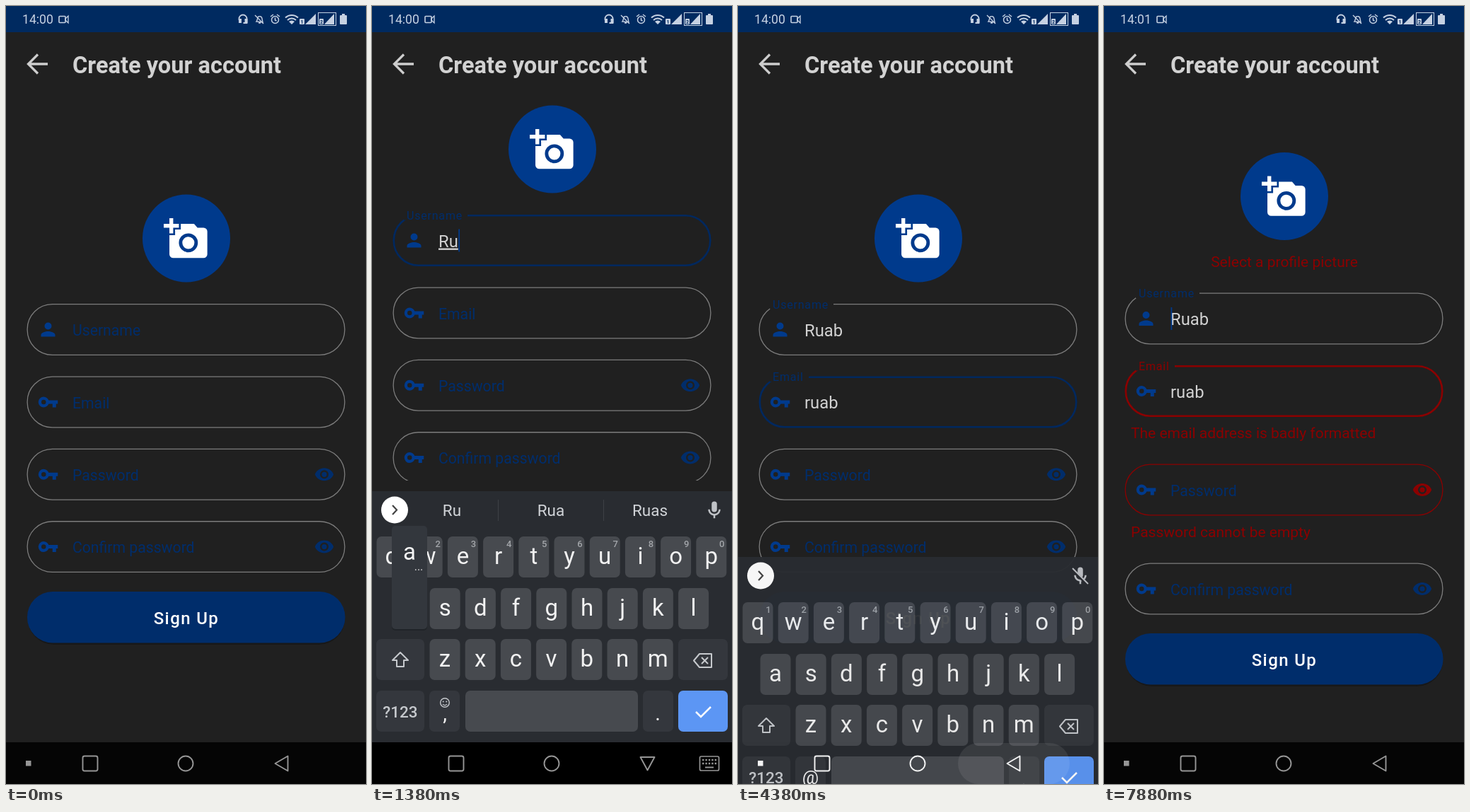
Recreate the animation shown at these times as an HTML page. Size 509 by 1100 pixels, loop 8 s.

```html
<!DOCTYPE html>
<html lang="en">
<head>
<meta charset="utf-8">
<title>Sign-up form</title>
<style>
html, body { margin: 0; height: 100%; overflow: hidden; background: #202020; }
svg { display: block; width: 100vw; height: 100vh; font-family: Roboto, sans-serif; }
</style>
</head>
<body>
<svg id="stage" viewBox="0 0 509 1100"></svg>
<script>
const LOOP = 8000, STEP = 125;
const BLUE = '#003a8c', NAVY = '#002d6b', RED = '#8b0000', GRAY = '#7c7c7c', BG = '#202020';
const NAME = 'Ruab', LOGIN = 'ruab';
const stage = document.getElementById('stage');
const ruler = document.createElement('canvas').getContext('2d');

const PERSON = 'M12 12a4 4 0 1 0 0-8 4 4 0 0 0 0 8zm0 2c-2.7 0-8 1.3-8 4v2h16v-2c0-2.7-5.3-4-8-4z';
const KEY = 'M12.65 10C11.8 7.7 9.6 6 7 6a6 6 0 0 0 0 12c2.6 0 4.8-1.7 5.65-4H17v4h4v-4h2v-4zM7 14.6a2.6 2.6 0 1 1 0-5.2 2.6 2.6 0 0 1 0 5.2z';
const EYE = 'M12 4.5C7 4.5 2.7 7.6 1 12c1.7 4.4 6 7.5 11 7.5s9.3-3.1 11-7.5c-1.7-4.4-6-7.5-11-7.5zM12 17a5 5 0 1 1 0-10 5 5 0 0 1 0 10zm0-8a3 3 0 1 0 0 6 3 3 0 0 0 0-6z';
const CAMERA = 'M3 4V1h2v3h3v2H5v3H3V6H0V4zM6 10V7h3V4h7l1.8 2H21a2 2 0 0 1 2 2v12a2 2 0 0 1-2 2H5a2 2 0 0 1-2-2V10zm7 9a5 5 0 1 0 0-10 5 5 0 0 0 0 10zm-3.2-5a3.2 3.2 0 1 0 6.4 0 3.2 3.2 0 0 0-6.4 0z';
const MIC = 'M12 14a3 3 0 0 0 3-3V5a3 3 0 0 0-6 0v6a3 3 0 0 0 3 3zm5-3a5 5 0 0 1-10 0H5c0 3.5 2.6 6.4 6 6.9V21h2v-3.1c3.4-.5 6-3.4 6-6.9z';

const mix = (a, b, p) => a + (b - a) * p;
const text = (s, x, y, size, fill, more = '') =>
  `<text x="${x}" y="${y}" font-size="${size}" fill="${fill}" ${more}>${s}</text>`;
const mid = (s, x, y, size, fill, more = '') => text(s, x, y, size, fill, 'text-anchor="middle" ' + more);
const rect = (x, y, w, h, fill, r = 0, more = '') =>
  `<rect x="${x}" y="${y}" width="${w}" height="${h}" rx="${r}" fill="${fill}" ${more}/>`;
const line = (d, color, w = 2, more = '') =>
  `<path d="${d}" fill="none" stroke="${color}" stroke-width="${w}" ${more}/>`;
const dot = (x, y, r, fill, more = '') => `<circle cx="${x}" cy="${y}" r="${r}" fill="${fill}" ${more}/>`;
const ring = (x, y, r, color, w, more = '') => dot(x, y, r, 'none', `stroke="${color}" stroke-width="${w}" ${more}`);
const icon = (d, x, y, scale, fill) =>
  `<path transform="translate(${x - 12 * scale} ${y - 12 * scale}) scale(${scale})" d="${d}" fill="${fill}" fill-rule="evenodd"/>`;
const group = (body, more) => `<g ${more}>${body}</g>`;

function textWidth(s, size) {
  ruler.font = size + 'px Roboto, sans-serif';
  return ruler.measureText(s).width;
}

function statusBar(clock) {
  const c = '#c6d1e2';
  return rect(0, 0, 509, 37, '#002a60') + text(clock, 23, 25, 17.6, c) +
    rect(75, 14.5, 9, 9, 'none', 1, `stroke="${c}" stroke-width="1.6"`) + line('M88 14v10l-4-4v-2z', c, 1.3) +
    line('M329.500 20v-2a5.500 5.500 0 0 1 11 0v6h-5', c, 1.8) + rect(329, 18, 4, 6, c) + rect(337.500, 18, 4, 6, c) +
    line('M352 13l12 12M354 22c2-2 1-6 3-7s5 0 5 3l1 5zM357 24h3', c, 1.4) +
    ring(380.5, 19.5, 5, c, 1.5) + line('M374 15l4-3M387 15l-4-3M380.500 16.500v3.500l2 1', c, 1.5) +
    line('M395 16.500a13 13 0 0 1 18 0M398 20a8.500 8.500 0 0 1 12 0', c, 2) + `<path d="M400 22a6 6 0 0 1 8 0l-4 4z" fill="${c}"/>` +
    `<path d="M438 11v15h-15zM464 11v15h-14z" fill="${c}"/>` +
    rect(415, 18, 7, 8, c, 1) + mid('1', 418.5, 25, 7, '#002a60', 'font-weight="700"') +
    rect(441.5, 9.5, 25, 18, 'none', 0, `stroke="${c}"`) +
    rect(443, 18, 6, 8, c, 1) + mid('2', 446, 25, 7, '#002a60', 'font-weight="700"') +
    rect(472, 13, 10, 13, c, 1) + rect(475, 11, 4, 3, c);
}

function field(y, o) {
  const { label, glyph, gap, value = '', float = 0, focus, error, eye, caret, typing } = o;
  const w = focus ? 2.6 : 1.3, inset = w / 2;
  const stroke = error ? RED : focus ? '#00285f' : GRAY;
  const tint = error && float ? RED : NAVY;
  let s = rect(29.5 + inset, y - 0.5 + inset, 450 - w, 73 - w, 'none', 36 - inset, `stroke="${stroke}" stroke-width="${w}"`);
  if (float) s += rect(45, y - 8, mix(0, gap - 45, float), 15, BG);
  s += text(label, mix(94, 49, float), y + mix(44.5, 6, float), mix(21.2, 16, float), tint, `letter-spacing="${0.8 * float}"`);
  s += icon(glyph, 59.5, y + 36, 1.25, BLUE);
  if (eye) s += icon(EYE, 450, y + 36, 1.2, error ? RED : NAVY);
  if (value) s += text(value, 94, y + 45, 23.8, '#d2d2d2', typing ? 'text-decoration="underline"' : '');
  if (caret !== undefined) s += rect(94.5 + textWidth(value.slice(0, caret), 23.8), y + 20, 1.8, 32, BLUE);
  return s;
}

function form(n, name, login) {
  const failed = n >= 42;
  const lift = n >= 3 && n < 35 ? 126 : 0;
  const tops = failed ? [406, 508.5, 648, 788] : [421.5, 524, 626.3, 728.6];
  const camY = failed ? 269 : 328.5, btnY = failed ? 887 : 828;
  const onName = n >= 1 && n < 20, onLogin = n >= 20;
  const nameCaret = n === 63 ? 0 : n >= 2 && n < 17 && n !== 7 ? name.length : undefined;
  const loginCaret = n >= 21 && n < 34 ? login.length : undefined;
  let s = dot(255, camY, 62, BLUE) +
    `<path transform="translate(223 ${camY - 31.2}) scale(2.68)" d="${CAMERA}" fill="#fff" fill-rule="evenodd"/>`;
  s += field(tops[0], { label: 'Username', glyph: PERSON, gap: 135, value: name, focus: onName,
    float: n < 1 ? 0 : n < 2 ? 0.5 : 1, caret: nameCaret, typing: onName });
  s += field(tops[1], { label: 'Email', glyph: KEY, gap: 100, value: login, focus: onLogin, error: failed,
    float: n < 20 ? 0 : n < 21 ? 0.5 : 1, caret: loginCaret, typing: n < 34 });
  s += field(tops[2], { label: 'Password', glyph: KEY, eye: true, error: failed });
  s += field(tops[3], { label: 'Confirm password', glyph: KEY, eye: true });
  s += rect(31, btnY + 2, 448, 73, '#111', 36.5, 'opacity=".5"') + rect(30, btnY, 449.5, 72.5, NAVY, 36);
  if (n >= 41 && n < 45) s += rect(30, btnY, 449.5, 72.5, '#fff', 36, `opacity="${n < 44 ? 0.14 : 0.07}"`);
  s += mid('Sign Up', 255, btnY + 46, 24, '#fff', 'font-weight="500" letter-spacing="1.4"');
  if (failed) s += group(
    mid('Select a profile picture', 255, 369, 21, RED) +
    text('The email address is badly formatted', 38, 611, 21, RED) +
    text('Password cannot be empty', 38, 751, 21, RED), `opacity="${n < 43 ? 0.5 : 1}"`);
  return `<clipPath id="page"><rect y="37" width="509" height="${lift ? 634 : 1004}"/></clipPath>` +
    group(group(s, `transform="translate(0 ${-lift})"`), 'clip-path="url(#page)"');
}

const ROWS = [['qwertyuiop', 28, 750], ['asdfghjkl', 53, 823], ['zxcvbnm', 103, 895]];
const PITCH = 50.2;

function popup(ch) {
  const row = ROWS.find(r => r[0].includes(ch.toLowerCase()));
  const x = row[1] + row[0].indexOf(ch.toLowerCase()) * PITCH, y = row[2];
  return rect(x - 25, y - 85, 50, 145, '#1c1e22', 5, 'opacity=".6"') +
    rect(x - 25, y - 88, 50, 146, '#33373d', 5) + mid(ch, x, y - 40, 33, '#f4f4f4') +
    ('aeioun'.includes(ch) ? mid('...', x + 13, y - 25, 16, '#ddd') : '');
}

function toolStrip() {
  const c = '#a0a3a7';
  return line('M35 706l-6 6.500 6 6.500', '#444', 2.2) +
    line('M91 703h16a2 2 0 0 1 2 2v10l-8 8h-10a2 2 0 0 1-2-2v-16a2 2 0 0 1 2-2zM109 715h-6a2 2 0 0 0-2 2v6M94 714a5 5 0 0 0 6 2M95 709v2M103 709v2', c) +
    mid('GIF', 172, 720, 19.5, c, 'font-weight="700" letter-spacing=".6"') +
    ring(246, 713, 6, c, 5) + ring(246, 713, 9.5, c, 3, 'stroke-dasharray="5 4.95"') +
    rect(308, 702, 22, 22, c, 2) + rect(364, 699, 1, 28, '#45484d') +
    [402, 410, 418].map(x => dot(x, 713, 2.4, c)).join('') + icon(MIC, 484, 713, 1.25, '#bfc2c6');
}

function wordStrip(n, name, login) {
  const c = '#d0d3d7', muted = n >= 21;
  let s = line('M29 706l6 6.500-6 6.500', '#444', 2.2) + icon(MIC, 484, 713, 1.25, '#bfc2c6');
  if (muted) s += line('M473 704l20 20', '#292c31', 4) + line('M473 702l22 22', '#bfc2c6', 2);
  if (n < 20) {
    const words = name.length < 3 ? [name, 'Rua', 'Ruas'] : [name, 'Rua', 'Ruas'].reverse();
    s += words.map((w, i) => mid(w, 113 + i * 140, 721, 22.5, c)).join('') +
      rect(178, 698, 1, 30, '#3e4146') + rect(327, 698, 1, 30, '#3e4146');
  } else if (login && n < 34) s += mid(login, 254, 721, 22.5, c);
  return s;
}

function keyboard(n, name, login) {
  const plain = '#474a4f', dark = '#34373d', ink = '#f2f2f2', soft = '#c6c9cd';
  const upper = n >= 4 && n < 9;
  let s = rect(0, 686, 509, 355, '#292c31') + dot(32, 712.5, 19, '#fff');
  s += n < 9 ? toolStrip() : wordStrip(n, name, login);
  ROWS.forEach(([letters, x0, y], r) => [...letters].forEach((ch, i) => {
    const x = x0 + i * PITCH;
    s += rect(x - 21.5, y, 43, 58, plain, 7) + mid(upper ? ch.toUpperCase() : ch, x, y + 39, 33, ink);
    if (!r) s += mid((i + 1) % 10, x + 15, y + 15, 13, '#a3a6aa', 'font-weight="500"');
  }));
  s += rect(6, 895, 68, 58, dark, 7) +
    line('M40 914l11 11h-6v9h-10v-9h-6z', soft, 2, `stroke-linejoin="round"${upper ? ` style="fill:${soft}"` : ''}`);
  s += rect(433, 895, 70, 58, dark, 7) +
    line('M463 916h17v19h-17l-8-9.500zM466 921l9 9M475 921l-9 9', soft, 2, 'stroke-linejoin="round"');
  s += rect(6, 968, 68, 58, dark, 7) + mid('?123', 40, 1006, 22.5, soft, 'font-weight="500"');
  s += rect(81, 968, 43, 58, dark, 7);
  s += n >= 21 ? mid('@', 102.5, 1007, 26, ink) :
    mid(',', 103, 1010, 29, ink) + ring(103, 985, 6.3, soft, 1.4) +
    dot(100.7, 983.5, 1, soft) + dot(105.3, 983.5, 1, soft) + line('M100 987a3.500 3.500 0 0 0 6 0', soft, 1.3);
  s += rect(132, 968, 244, 58, plain, 7) + rect(383, 968, 43, 58, dark, 7) + mid('.', 404, 1010, 29, ink);
  s += rect(433, 968, 70, 58, '#5c96f4', 7) + line('M458 998l7 7 14-14', '#fff', 2.5);
  const pressed = { 8: 'R', 10: 'u', 11: 'a', 12: 'b', 24: 'r', 25: 'r', 27: 'u', 28: 'a', 29: 'b' }[n];
  if (pressed) s += popup(pressed);
  const [drop, alpha] = { 2: [70, 0.45], 3: [14, 0.85], 35: [93, 0.96], 36: [260, 0.45] }[n] || [0, 1];
  return (n === 3 ? rect(0, 686, 509, 355, '#fff') : '') +
    group(s, `transform="translate(0 ${drop})" opacity="${alpha}"`);
}

function navIcons(n) {
  const open = n >= 3 && n < 35;
  const glow = n < 35 ? 150 : Math.round(mix(245, 150, Math.min(1, Math.max(0, (n - 52) / 9))));
  const c = `rgb(${glow},${glow},${glow})`;
  let s = rect(108.5, 1060.5, 21, 21, 'none', 2.5, `stroke="${c}" stroke-width="1.9"`) + ring(254, 1071, 10.5, c, 1.9);
  if (open) {
    s += line('M379.500 1062h20l-10 18.500z', c, 1.9, 'stroke-linejoin="round"') +
      rect(463.5, 1061, 27, 20, 'none', 2, `stroke="${c}" stroke-width="1.7"`) +
      line('M467 1066h20M467 1071h20', c, 2.4, 'stroke-dasharray="2.4 2"') + line('M471 1076.500h12', c, 2);
  } else {
    s += rect(28, 1067, 7.5, 7.5, c) + line('M380.500 1071l18-10.500v21z', c, 1.9, 'stroke-linejoin="round"');
  }
  const ripple = { 34: 0.1, 35: 0.08, 36: 0.06, 37: 0.03 }[n];
  if (ripple) s += rect(311, 1042, 158, 58, '#fff', 29, `opacity="${ripple}"`);
  return s;
}

function draw(n) {
  const typed = (word, times) => word.slice(0, times.filter(t => n >= t).length);
  const name = typed(NAME, [9, 11, 12, 13]), login = typed(LOGIN, [26, 28, 29, 31]);
  stage.innerHTML = rect(0, 0, 509, 1100, BG) +
    statusBar(n < 53 ? '14:00' : '14:01') +
    line('M59 82H33M45 68.500L31.500 82 45 95.500', '#cdcdcd', 3.3) +
    text('Create your account', 94, 95, 32.6, '#d2d2d2', 'font-weight="700"') +
    form(n, name, login) +
    rect(0, 1041, 509, 59, n >= 3 && n < 35 ? '#000' : '#050505') +
    (n >= 2 && n < 37 ? keyboard(n, name, login) : '') +
    navIcons(n);
}

let shown = -1;
const start = performance.now();
function tick() {
  const n = Math.floor((performance.now() - start) % LOOP / STEP);
  if (n !== shown) draw(shown = n);
  requestAnimationFrame(tick);
}
tick();
</script>
</body>
</html>
```
